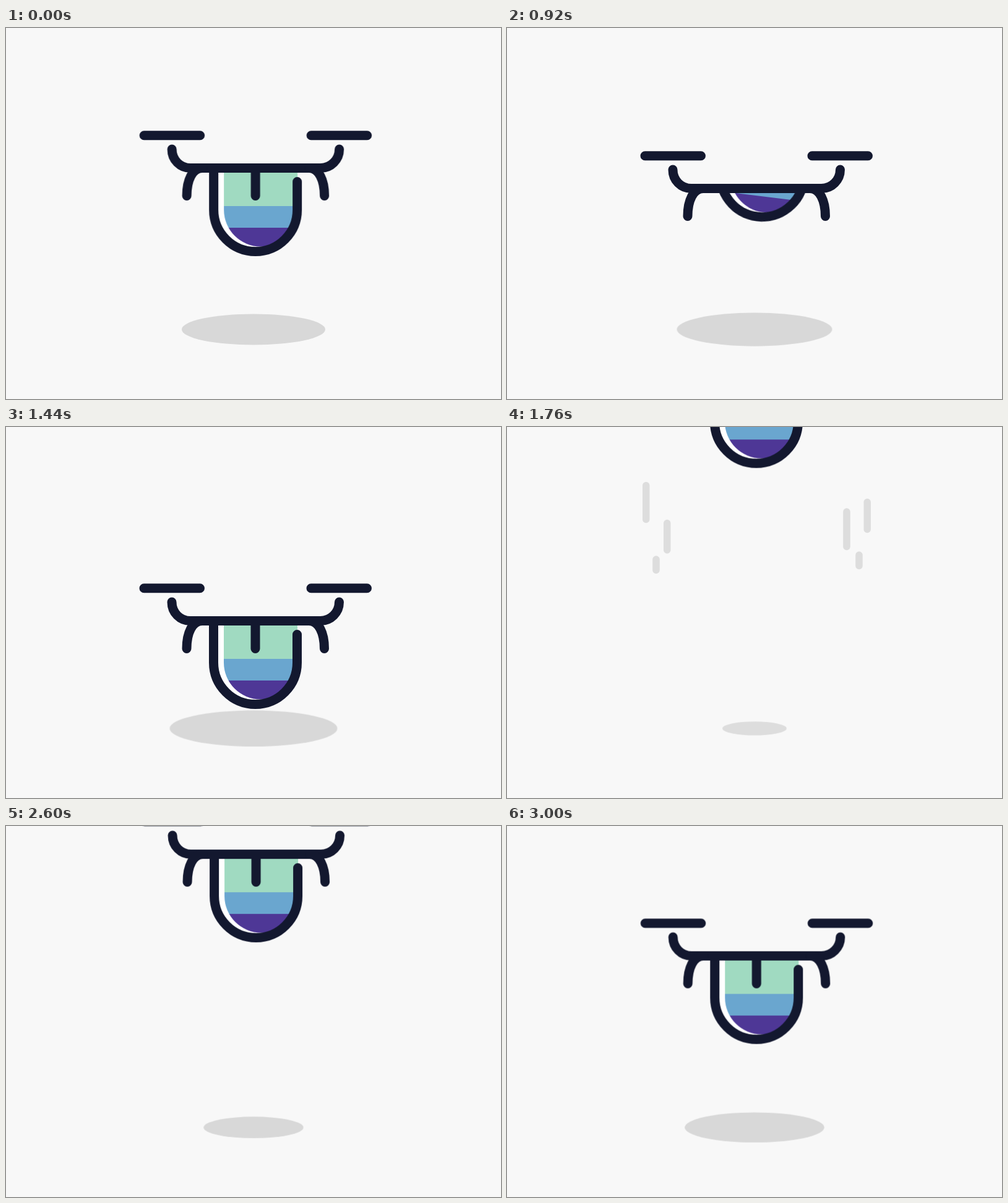
An HTML page that plays this animation: 800 px wide and 600 px high, repeating every 3040 ms.

```html
<!DOCTYPE html>
<html lang="en">
<head>
<meta charset="utf-8">
<title>Hovering drone</title>
<style>
  html, body { margin: 0; width: 100%; height: 100%; overflow: hidden; background: #f8f8f8; }
  svg { display: block; width: 800px; height: 600px; }

  .ink { fill: none; stroke: #13182f; stroke-width: 15; stroke-linecap: round; }
  .trail path { fill: none; stroke: #ddd; stroke-width: 11.5; stroke-linecap: round; stroke-dasharray: 1 2; }

  /* Paused: the script winds the clock through the delay. */
  .drone, .shadow, .tongue, .stripes, .trail path {
    animation-duration: 3040ms;
    animation-timing-function: linear;
    animation-iteration-count: infinite;
    animation-play-state: paused;
    animation-delay: var(--clock, 0ms);
  }
  .drone { animation-name: fly; }
  .shadow { animation-name: cast; transform-origin: 400px 487.5px; }
  .tongue { animation-name: lick; transform-origin: 403px 294px; }
  .stripes { animation-name: lag; }
  .trail path { animation-name: streak; }

  @keyframes fly {
    0% { transform: translate(.17px, 0); animation-timing-function: cubic-bezier(.15, .6, .3, 1); }
    10.526% { transform: translate(0, 32.2px); }
    30.263% { transform: translate(0, 33px); }
    36.842% { transform: translate(0, 33px); animation-timing-function: ease-in-out; }
    46.053% { transform: translate(0, 88px); }
    47.368% { transform: translate(0, 87px); animation-timing-function: cubic-bezier(.45, .1, .75, .66); }
    55.263% { transform: translate(0, -182.5px); }
    57.895% { transform: translate(0, -302.7px); }
    60.526%, 67.1% { transform: translate(0, -420px); }
    67.105% { transform: translate(2.3px, -411px); }
    100% { transform: translate(.17px, 0); }
  }
  @keyframes cast {
    0% { transform: scale(1); animation-timing-function: ease-out; }
    10.526% { transform: scale(1.017); animation-timing-function: ease-in-out; }
    18.421% { transform: scale(1.095); }
    30.263% { transform: scale(1.082); }
    36.842% { transform: scale(1.082); animation-timing-function: ease-in-out; }
    46.053% { transform: scale(1.178); }
    47.368% { transform: scale(1.168); animation-timing-function: cubic-bezier(.45, .1, .75, .66); }
    55.263% { transform: scale(.672); opacity: 1; }
    57.895% { transform: scale(.447); opacity: .84; }
    60.526% { transform: scale(.29); opacity: .75; }
    67.105% { transform: scale(.308); opacity: .75; }
    75% { opacity: 1; }
    100% { transform: scale(1); }
  }
  @keyframes lick {
    0%, 19.737% { transform: none; animation-timing-function: ease-in-out; }
    27.632%, 31.579% { transform: translate(9.5px, -89px) rotate(7deg); animation-timing-function: ease-in-out; }
    38.158%, 100% { transform: none; }
  }
  @keyframes lag {
    0%, 19.737% { transform: none; animation-timing-function: ease-in-out; }
    27.632%, 31.579% { transform: translateY(5px); animation-timing-function: ease-in-out; }
    38.158%, 100% { transform: none; }
  }
  @keyframes streak {
    0%, 55.263% { stroke-dashoffset: 1; opacity: 0; }
    55.3% { stroke-dashoffset: 1; opacity: 1; }
    57.895%, 59.211% { stroke-dashoffset: 0; opacity: 1; }
    64.4% { stroke-dashoffset: -1; opacity: 1; }
    64.474%, 100% { stroke-dashoffset: -1; opacity: 0; }
  }
</style>
</head>
<body>
<svg viewBox="0 0 800 600">
  <defs>
    <clipPath id="below"><rect x="200" y="226" width="400" height="200"/></clipPath>
    <clipPath id="fill"><path d="M352 220H471V294A59.5 59.5 0 0 1 352 294Z"/></clipPath>
  </defs>

  <ellipse class="shadow" cx="400" cy="487.5" rx="116" ry="25" fill="#d8d8d8"/>

  <g class="trail">
    <path pathLength="1" d="M224.75 149.5V94.5"/>
    <path pathLength="1" d="M258.75 199V155.5"/>
    <path pathLength="1" d="M241 231.5V214"/>
    <path pathLength="1" d="M549 193.5V137"/>
    <path pathLength="1" d="M582.25 165.5V121.5"/>
    <path pathLength="1" d="M569 224.5V207"/>
  </g>

  <g class="drone">
    <g clip-path="url(#below)">
      <g class="tongue">
        <path d="M335.5 226V294A67.5 67.5 0 0 0 470.5 294V226Z" fill="#fff"/>
        <g clip-path="url(#fill)">
          <g class="stripes">
            <rect x="340" y="200" width="140" height="90" fill="#a0dac1"/>
            <rect x="340" y="288" width="140" height="37" fill="#6aa6cf"/>
            <rect x="340" y="323" width="140" height="40" fill="#4e3796"/>
          </g>
        </g>
        <path class="ink" d="M335.5 226V294A67.5 67.5 0 0 0 470.5 294V248.5M403 226V271.5"/>
      </g>
    </g>
    <path class="ink" d="M223 173.75H313.5M493 173.75H583.5"/>
    <path class="ink" d="M268 196C268 213 281 226.5 298 226.5H508C525 226.5 538.5 213 538.5 196"/>
    <path class="ink" d="M292 271.5C292 246 301 226.5 317 226.5M514.5 271.5C514.5 246 505.5 226.5 489.5 226.5"/>
  </g>
</svg>
<script>
  const LOOP = 3040, STEP = 40;
  const start = performance.now();

  // Advance in whole steps, 25 per second.
  function tick() {
    const time = (performance.now() - start + 1) % LOOP;
    const stepped = Math.floor(time / STEP) * STEP;
    document.documentElement.style.setProperty('--clock', -stepped + 'ms');
    requestAnimationFrame(tick);
  }
  tick();
</script>
</body>
</html>
```
